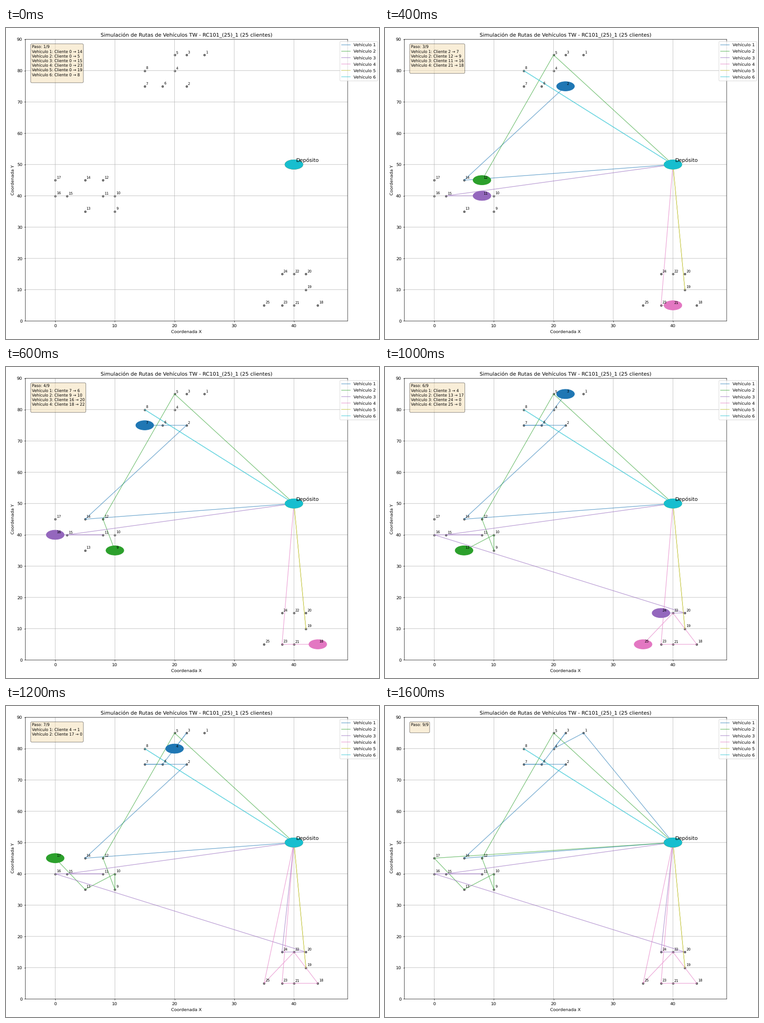
Recreate the animation shown at these times as a matplotlib script. Size 820 by 683 pixels, loop 1800 ms.

```python
import matplotlib.pyplot as plt
import numpy as np
from matplotlib.animation import FuncAnimation
from matplotlib.patches import Circle

W, H = 820, 683
DPI = W / 12
STEP_MS = 200
DEPOT = (40, 50)

# Unsnapped lines and unhinted glyphs keep fractional pixel positions
plt.rcParams.update({"font.family": "DejaVu Sans", "text.hinting": "none",
                     "path.snap": False})

# Each cluster: corner, then columns as {x offset: rows}, with rows 5 units apart
ROW = 5
CLUSTERS = [
    ((15, 75), {10: [2], 7: [0, 2], 5: [1, 2], 3: [0], 0: [0, 1]}),
    ((0, 35), {10: [0, 1], 8: [1, 2], 5: [0, 2], 2: [1], 0: [1, 2]}),
    ((35, 5), {9: [0], 7: [1, 2], 5: [0, 2], 3: [0, 2], 0: [0]}),
]
# Clients in the order each vehicle visits them, between leaving and returning
VISITS = [
    [14, 2, 7, 6, 3, 4, 1],
    [5, 12, 9, 10, 13, 17],
    [15, 11, 16, 20, 24],
    [23, 21, 18, 22, 25],
    [19],
    [8],
]

clients = [(x + dx, y + ROW * row)
           for (x, y), columns in CLUSTERS
           for dx, rows in columns.items()
           for row in rows]
nodes = np.array([DEPOT] + clients)
routes = [[0, *visits, 0] for visits in VISITS]
steps = max(map(len, routes))
colors = plt.get_cmap("tab10")(np.linspace(0, 1, len(routes)))

# The tiny margin keeps the pixel size from being truncated by one
fig = plt.figure(figsize=((W + 1e-6) / DPI, (H + 1e-6) / DPI), dpi=DPI)
LEFT, RIGHT, TOP, BOTTOM = 42.6, 751.1, 24.95, 643.4
ax = fig.add_axes([LEFT / W, 1 - BOTTOM / H, (RIGHT - LEFT) / W, (BOTTOM - TOP) / H])
ax.set(xlim=(-5, 49), ylim=(0, 90),
       xticks=range(0, 50, 10), yticks=range(0, 100, 10),
       xlabel="Coordenada X", ylabel="Coordenada Y",
       title="Simulación de Rutas de Vehículos TW - RC101_(25)_1 (25 clientes)")
ax.grid(True)


def label(text, point, offset, size):
    ax.annotate(text, point, xytext=(offset, offset),
                textcoords="offset points", fontsize=size)


ax.scatter(*nodes[1:].T, s=22, c="gray", edgecolors="black", linewidths=0.5)
ax.plot(*DEPOT, "ks", markersize=8, zorder=2.2)
label("Depósito", DEPOT, 5, 12)
for number, client in enumerate(clients, 1):
    label(str(number), client, 3, 8)

lines, vehicles = [], []
for number, color in enumerate(colors, 1):
    line, = ax.plot([], [], color=color, alpha=0.6, label=f"Vehículo {number}")
    lines.append(line)
    vehicles.append(ax.add_patch(Circle(DEPOT, 1.5, color=color, zorder=2.5)))

ax.legend(loc="upper right", bbox_to_anchor=(1.1, 1), labelspacing=0.56)
info = ax.text(0.02, 0.98, "", transform=ax.transAxes, va="top", fontsize=9,
               linespacing=1.22,
               bbox=dict(boxstyle="round", facecolor="wheat", alpha=0.5))


def update(step):
    text = f"Paso: {step + 1}/{steps}\n"
    for number, (route, line, vehicle) in enumerate(zip(routes, lines, vehicles), 1):
        path = nodes[route[:step + 1]]
        line.set_data(*path.T)
        vehicle.center = tuple(path[-1])
        if step + 1 < len(route):
            text += f"Vehículo {number}: Cliente {route[step]} → {route[step + 1]}\n"
    info.set_text(text)
    return [*lines, *vehicles, info]


anim = FuncAnimation(fig, update, frames=steps, init_func=lambda: update(0),
                     interval=STEP_MS, repeat=True, blit=False)
plt.show()
```
